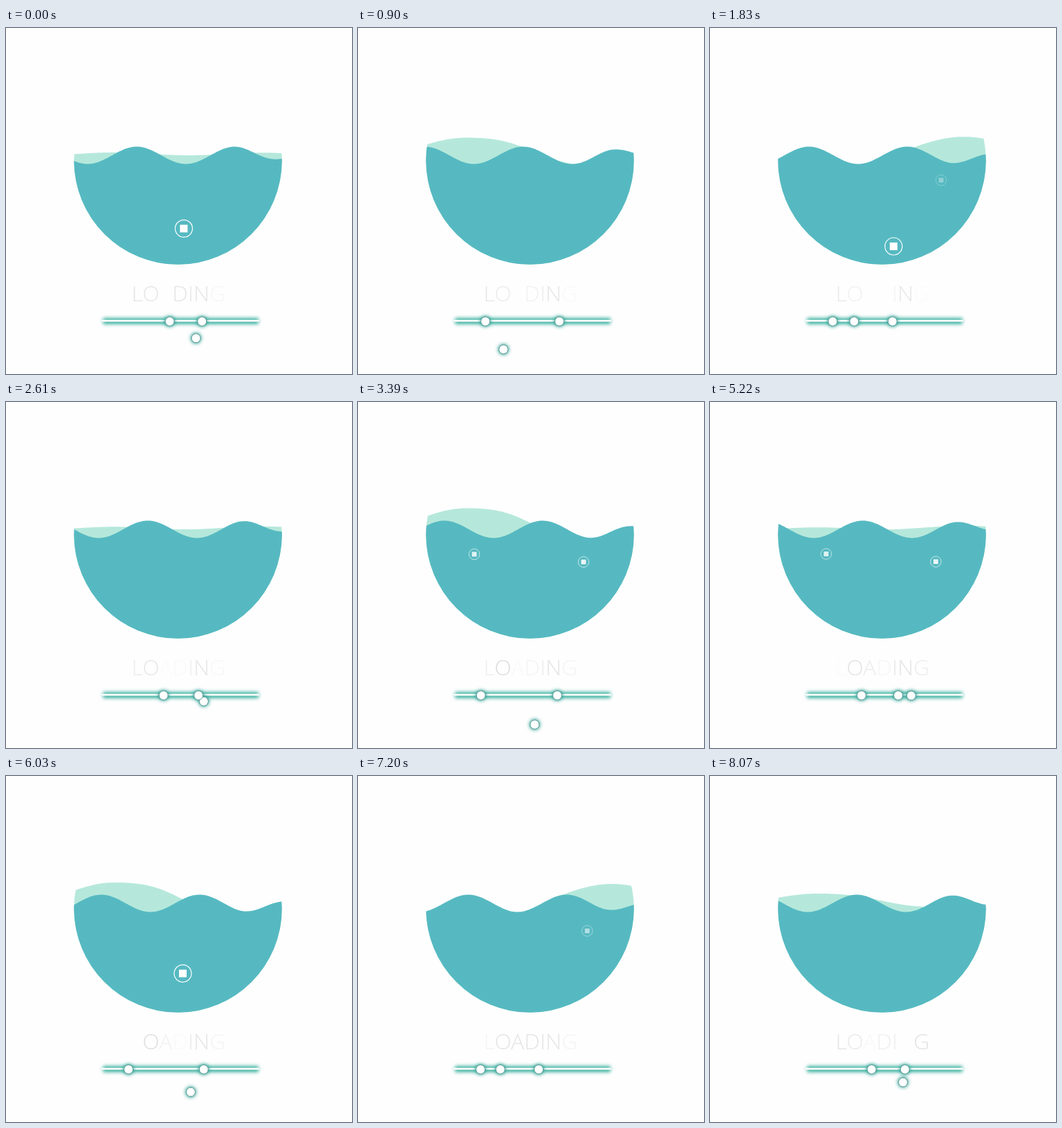
Animation, 500 px wide and 500 px high, one loop 8100 ms. Source, as an HTML page:

```html
<!DOCTYPE html>
<html lang="en">
<head>
<meta charset="utf-8">
<title>Loading</title>
<style>
  html, body { margin: 0; width: 100%; height: 100%; overflow: hidden; background: #fefefe; }
  svg { display: block; width: 100vw; height: 100vh; }
  text { font: 300 32px "Open Sans", sans-serif; fill: #ccc; }
</style>
</head>
<body>
<svg viewBox="0 0 500 500">
  <defs>
    <clipPath id="bowl"><circle cx="248.5" cy="191.5" r="150.3"/></clipPath>
    <filter id="soft" filterUnits="userSpaceOnUse" x="0" y="0" width="500" height="500">
      <feGaussianBlur stdDeviation="2.6"/>
    </filter>
    <g id="bubble">
      <circle r="12.5" fill="none" stroke="#fff" stroke-width="1.2"/>
      <rect x="-5.5" y="-5.5" width="11" height="11" fill="#fff"/>
    </g>
  </defs>
  <g clip-path="url(#bowl)">
    <path id="back" fill="#b5e8db"/>
    <path id="front" fill="#56b9c1"/>
    <g id="bubbles"></g>
  </g>
  <text id="label" x="181.5" y="395"></text>
  <rect x="140" y="419" width="225" height="9" rx="2" fill="#3fb3a2" filter="url(#soft)"/>
  <rect x="138" y="421.7" width="228" height="2.8" rx="1.4" fill="#fff"/>
  <g id="glows" fill="#2f9f92" filter="url(#soft)"></g>
  <g id="balls" fill="#fff" stroke="#5a9a98" stroke-width="1"></g>
</svg>
<script>
const LOOP = 8100;
const $ = id => document.getElementById(id);
const mod = (a, n) => ((a % n) + n) % n;
const clamp = v => Math.min(1, Math.max(0, v));
const ease = u => (1 - Math.cos(Math.PI * clamp(u))) / 2;

function add(parent, tag, attrs = {}) {
  const node = document.createElementNS("http://www.w3.org/2000/svg", tag);
  for (const key in attrs) node.setAttribute(key, attrs[key]);
  return parent.appendChild(node);
}

// Waves
function fillBelow(path, heightAt) {
  let d = "M96 345";
  for (let x = 96; x <= 402; x += 2) d += `L${x} ${heightAt(x).toFixed(2)}`;
  path.setAttribute("d", d + "L402 345Z");
}

function frontHeight(x, t) {
  const crest = 189 - 0.1027 * t;
  const fade = x > 325 ? Math.cos((x - 325) * 0.9 * Math.PI / 180) : 1;
  return 184 - 12.5 * fade * Math.cos((x - crest) * 2 * Math.PI / 142);
}

function backHeight(x, t) {
  const swing = Math.sin(2 * Math.PI * t / 2625 + 0.02);
  const lift = swing > 0 ? 28 * swing ** 1.35 : 24 * swing;
  const a = (x - 157) * Math.PI / 210;
  const bulge = a > 0 && a < Math.PI * 2 / 3 ? Math.sin(1.5 * a) ** 2 : 0;
  return 182 - lift * Math.cos(a) - 2 * Math.cos(2 * a) - 0.19 * lift * bulge;
}

// Bubbles: each passes (x, y) at time `at`, repeating with `period`
const bubbles = [
  { x: 257, y: 290, vx: -0.049, vy: -0.151, at: 0, period: 2000, size: 1,
    from: 0, to: 7600, rise: 330, alpha: s => clamp((s + 330) / 130) * clamp((560 - s) / 200) },
  { x: 334, y: 220, vx: 0.031, vy: -0.043, at: 1830, period: 1820, size: 0.62,
    from: 300, to: LOOP, rise: 700, alpha: fadeSmall },
  { x: 163, y: 211, vx: -0.023, vy: -0.041, at: 3610, period: 1820, size: 0.62,
    from: 2500, to: 6700, rise: 700, alpha: fadeSmall }
];
function fadeSmall(s) {
  return Math.min(0.88, clamp((s + 700) / 200), clamp(0.35 - 0.0022 * s));
}
for (const b of bubbles) b.node = add($("bubbles"), "use", { href: "#bubble" });

function drawBubble(b, t) {
  const s = mod(t - b.at + b.rise, b.period) - b.rise;
  const shown = t >= b.from && t < b.to;
  b.node.setAttribute("opacity", shown ? b.alpha(s) : 0);
  b.node.setAttribute("transform", `translate(${b.x + b.vx * s} ${b.y + b.vy * s}) scale(${b.size})`);
}

// Letters: opacity levels eased between shared moments
const moments = [0, 1830, 3390, 4350, 6030, 7200, 8070];
const letters = [
  ["L", [0.5, 0.42, 0.3, 0.15, 0, 0.2, 0.5]],
  ["O", [0.45, 0.25, 0.65, 0.45, 0.6, 0.5, 0.4]],
  ["A", [0, 0, 0.1, 0.45, 0.25, 0.5, 0.12]],
  ["D", [0.5, 0, 0.2, 0.2, 0.1, 0.5, 0.3]],
  ["I", [0.45, 0.2, 0.35, 0.5, 0.4, 0.5, 0.3]],
  ["N", [0.5, 0.45, 0.5, 0.5, 0.5, 0.5, 0]],
  ["G", [0.15, 0.06, 0.2, 0.5, 0.2, 0.2, 0.55]]
].map(([char, levels]) => {
  const node = add($("label"), "tspan");
  node.textContent = char;
  return { node, levels };
});

function drawLetter({ node, levels }, t) {
  let i = 0;
  while (i < moments.length - 2 && t > moments[i + 1]) i++;
  const u = ease((t - moments[i]) / (moments[i + 1] - moments[i]));
  node.setAttribute("fill-opacity", levels[i] + (levels[i + 1] - levels[i]) * u);
}

// Balls slide right along the bar, then swing back underneath
const balls = [610, 1195, 1770].map(start => ({
  start,
  nodes: [
    add($("glows"), "circle", { r: 7.8 }),
    add($("balls"), "circle", { r: 6.5 })
  ]
}));

function drawBall({ start, nodes }, t) {
  const s = mod(t - start, 2700);
  const back = ease((s - 1890) / 810);
  const x = 177 + 114 * (ease(s / 1810) - back);
  const y = 424 + 196 * back * (1 - back);
  for (const node of nodes) {
    node.setAttribute("cx", x);
    node.setAttribute("cy", y);
  }
}

function draw(t) {
  fillBelow($("back"), x => backHeight(x, t));
  fillBelow($("front"), x => frontHeight(x, t));
  bubbles.forEach(b => drawBubble(b, t));
  letters.forEach(l => drawLetter(l, t));
  balls.forEach(b => drawBall(b, t));
}

const begin = performance.now();
function tick() {
  draw((performance.now() - begin) % LOOP);
  requestAnimationFrame(tick);
}
draw(0);
requestAnimationFrame(tick);
</script>
</body>
</html>
```
